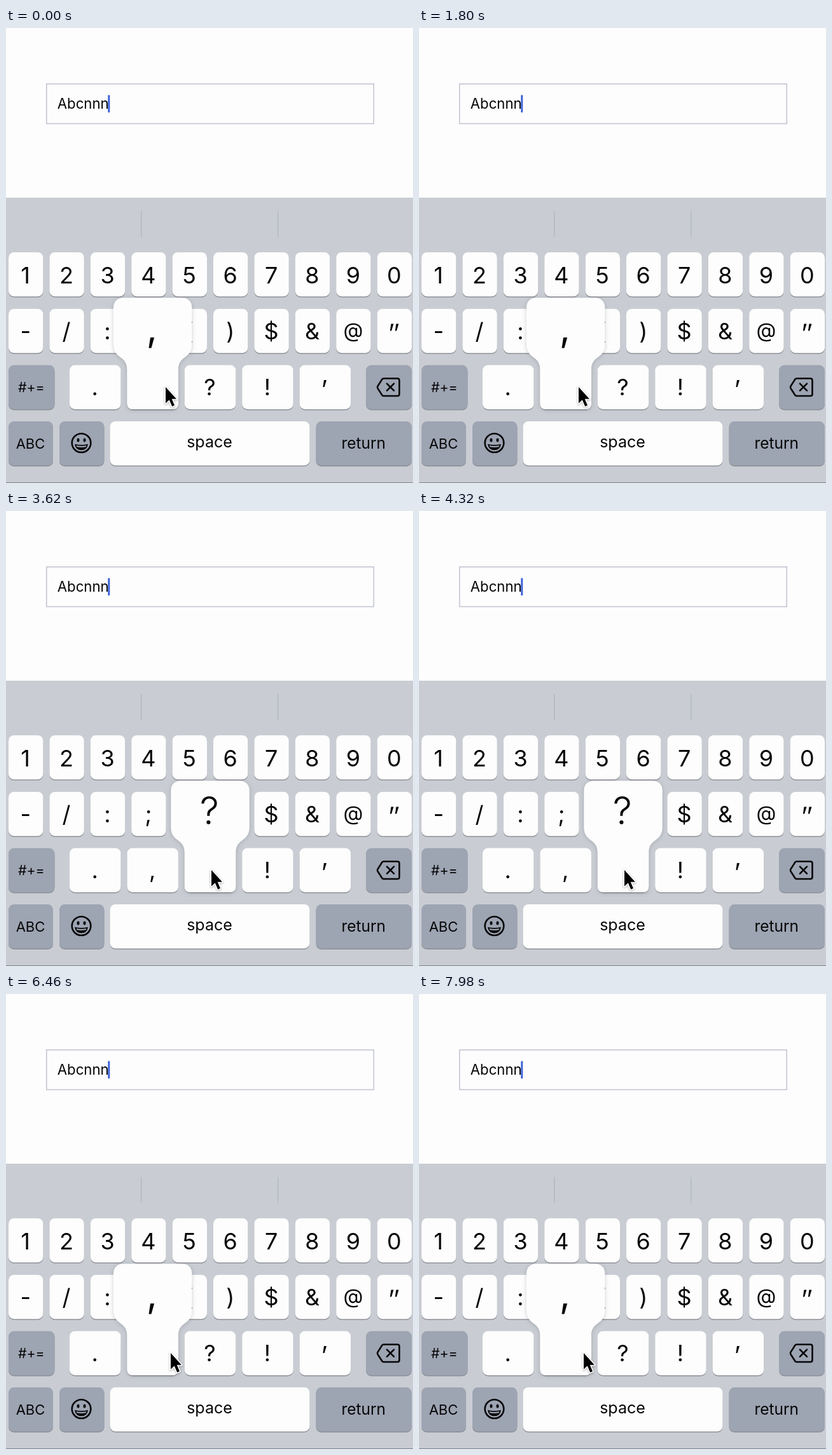
Animation of 640 by 716 pixels, one loop 8 s. Source, as an HTML page:

```html
<!DOCTYPE html>
<html lang="en">
<head>
<meta charset="utf-8">
<title>Keyboard</title>
<style>
html, body { margin: 0; width: 100%; height: 100%; overflow: hidden; background: #fdfdfd; }
svg { display: block; width: 640px; height: 716px; }
text { font-family: Inter, Roboto, "Liberation Sans", sans-serif; fill: #060607; text-anchor: middle; }
.key { fill: #fdfdfd; }
.dark { fill: #9da4b2; }
.edge { fill: #8d9096; }
.ink { fill: none; stroke: #060607; stroke-width: 2.6; stroke-linecap: round; stroke-linejoin: round; }
.pop { filter: drop-shadow(0 1px 3px rgba(60, 65, 78, .26)); }
.pop text { font-size: 60px; }
#comma { animation: comma 8s step-end infinite; }
#question { animation: question 8s step-end infinite; }
#question text { font-weight: 300; }
#cursor { animation: move 8s ease-in-out infinite; filter: drop-shadow(0 1px 1.5px rgba(0, 0, 0, .3)); }
@keyframes comma { 0% { opacity: 1 } 32.5% { opacity: 0 } 73.75%, 100% { opacity: 1 } }
@keyframes question { 0% { opacity: 0 } 37.5% { opacity: 1 } 68.75%, 100% { opacity: 0 } }
@keyframes move {
  0%, 32% { transform: translate(251px, 565px) }
  34.5%, 37% { transform: translate(319px, 565px) }
  38%, 68.75% { transform: translate(323px, 565px) }
  73.25%, 100% { transform: translate(259px, 565px) }
}
</style>
</head>
<body>
<svg viewBox="0 0 640 716">
  <rect width="640" height="716" fill="#fdfdfd"/>
  <rect x="63.75" y="88" width="514.5" height="62.5" fill="none" stroke="#c3c5d3" stroke-width="1.6"/>
  <text x="80.8" y="127" font-size="22.2" style="text-anchor:start">Abcnnn</text>
  <rect x="160.3" y="105.5" width="3" height="27.5" rx="1" fill="#3d62d9"/>
  <rect y="267" width="640" height="449" fill="#c9cdd3"/>
  <rect x="212" y="288" width="1.4" height="41" fill="#b2b6be"/>
  <rect x="427" y="288" width="1.4" height="41" fill="#b2b8bc"/>
  <rect y="715" width="640" height="1" fill="#7c7f85"/>
  <g id="keys"></g>

  <g class="ink">
    <path d="M594 551.5H615.500q3 0 3 3V576q0 3-3 3H594q-1.500 0-2.600-1.200L584.500 567q-1.200-1.700 0-3.400L591.400 552.700q1.100-1.200 2.600-1.200Z"/>
    <path d="M599 559.700l11 11m0-11l-11 11"/>
    <circle cx="118.500" cy="653" r="14.800"/>
  </g>
  <g fill="#060607">
    <ellipse cx="113.500" cy="648.500" rx="2" ry="2.900"/>
    <ellipse cx="123.500" cy="648.500" rx="2" ry="2.900"/>
    <path d="M108 654.800q10.500 2.500 21 0q-1.500 9.500-10.500 9.500t-10.500-9.500Z"/>
    <path d="M605.500 465.500h4l-3.300 11h-2.300ZM613.500 465.500h4l-3.300 11h-2.300Z"/>
    <path d="M500 554h4l-3.300 11h-2.300Z"/>
  </g>
  <path d="M110.500 657q8 1.600 16 0l-.8 2.300q-7.200 1.300-14.400 0Z" fill="#9da4b2"/>

  <g id="pops"></g>

  <g id="cursor">
    <path d="M0 0V25.500L5.800 20.200L10.200 30.500L14 28.800L9.700 18.700H17Z"
      fill="#000" stroke="#fdfdfd" stroke-width="3.400" stroke-linejoin="round" paint-order="stroke"/>
  </g>
</svg>
<script>
const NS = "http://www.w3.org/2000/svg";
const keys = document.getElementById("keys");
const pops = document.getElementById("pops");

function add(parent, tag, attrs, label) {
  const el = document.createElementNS(NS, tag);
  for (const k in attrs) el.setAttribute(k, attrs[k]);
  if (label) el.textContent = label;
  return parent.appendChild(el);
}

function key(x, y, w, label, base, size = 36, dark = false) {
  const box = { x, width: w, height: 69.5, rx: 8.5 };
  add(keys, "rect", { ...box, y: y + 1.6, class: "edge" });
  add(keys, "rect", { ...box, y, class: dark ? "dark" : "key" });
  if (label) add(keys, "text", { x: x + w / 2 - 0.5, y: base, "font-size": size }, label);
}

// Key preview: wide bulb narrowing into the pressed key
function popup(id, x, label) {
  const g = add(pops, "g", { id, class: "pop" });
  const l = x - 21.5, r = x + 102, k = x + 80.5;
  add(g, "path", {
    class: "key",
    d: `M${l + 17} 424.5H${r - 17}Q${r} 424.5 ${r} 441V497C${r} 522 ${k} 514 ${k} 538V591
      Q${k} 600 ${k - 9} 600H${x + 9}Q${x} 600 ${x} 591V538C${x} 514 ${l} 522 ${l} 497V441Q${l} 424.5 ${l + 17} 424.5Z`
  });
  add(g, "text", { x: x + 39, y: 493 }, label);
}

[..."1234567890"].forEach((c, i) => key(4 + i * 64.4, 353, 54.4, c, 402));
["-", "/", ":", ";", "(", ")", "$", "&", "@", ""].forEach((c, i) =>
  key(4 + i * 64.4, 442, 54.4, c, c === "@" ? 487 : 489.5, c === "@" ? 32 : 36));
[".", ",", "?", "!", ""].forEach((c, i) => key(100 + i * 90.4, 530.5, 80.5, c, 578));
key(4, 530.5, 72.5, "#+=", 573, 21.3, true);
key(566, 530.5, 72, "", 0, 0, true);
key(4, 619, 70, "ABC", 662, 22, true);
key(84, 619, 70.5, "", 0, 0, true);
key(163.5, 619, 314, "space", 660, 25);
key(487.5, 619, 150.5, "return", 662, 24.5, true);

popup("comma", 190.4, ",");
popup("question", 280.8, "?");
</script>
</body>
</html>
```
